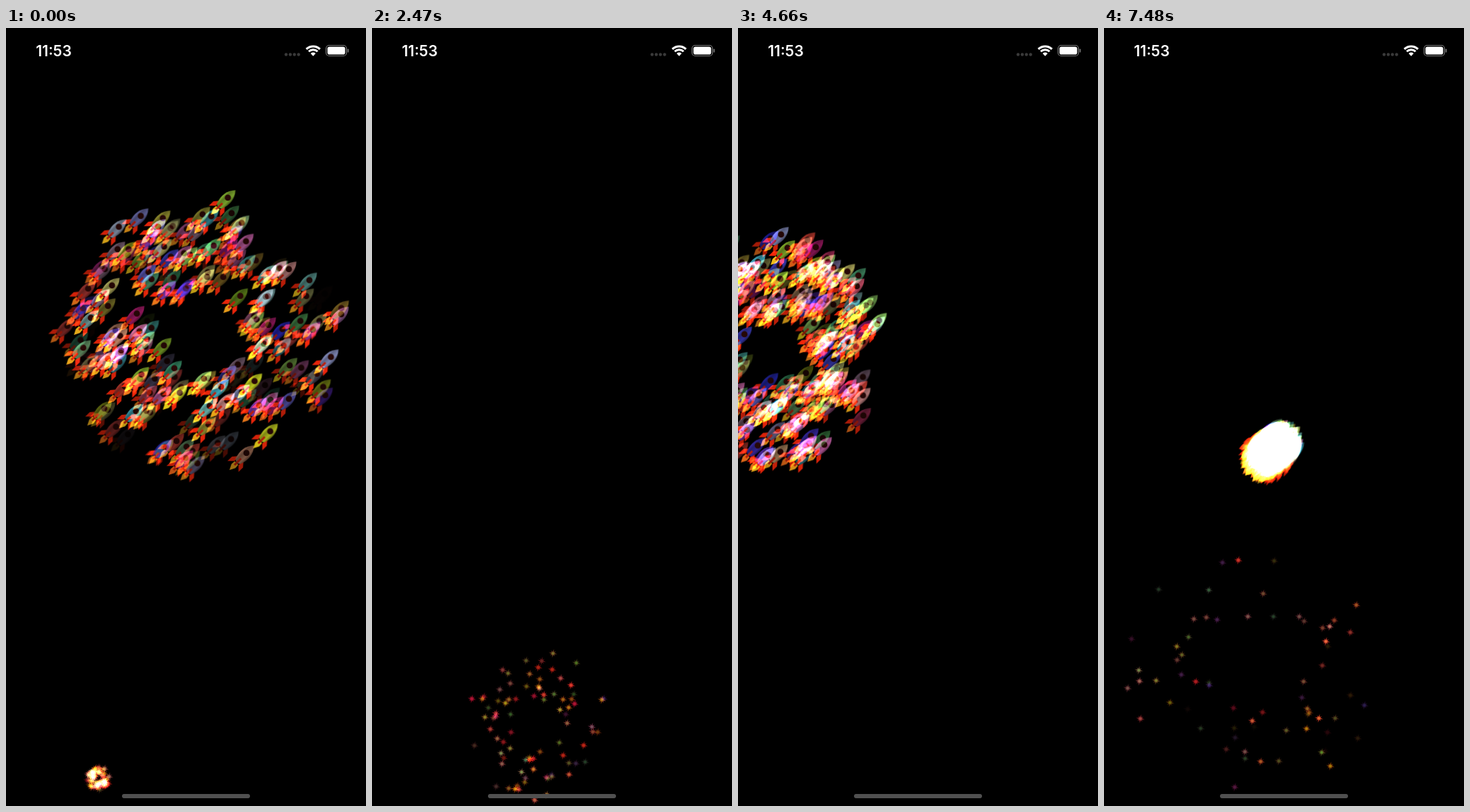
These frames come from a looping animation (509 px wide and 1100 px high, 7530 ms). An HTML page with a canvas:

```html
<!DOCTYPE html>
<html lang="en">
<head>
<meta charset="utf-8">
<title>Fireworks</title>
<style>
  html, body { margin: 0; width: 100%; height: 100%; overflow: hidden; background: #000; }
  canvas { display: block; }
</style>
</head>
<body>
<canvas id="stage" width="509" height="1100"></canvas>
<script>
const LOOP = 7530, TINTS = 60, SPRITE = 56;
const ctx = document.getElementById('stage').getContext('2d');

// Birth in ms, centre, kind
const bursts = [
  [-600, 275, 430, 'rocket'], [-56, 131, 1061, 'star'], [476, 400, 640, 'rocket'],
  [1035, 90, 382, 'rocket'], [1558, 293, 157, 'rocket'], [2100, 230, 985, 'star'],
  [2640, 362, 987, 'rocket'], [3140, 205, 160, 'rocket'], [3668, 215, 930, 'star'],
  [4170, 52, 455, 'rocket'], [4735, 260, 915, 'rocket'], [5260, 190, 612, 'rocket'],
  [5799, 131, 422, 'star'], [6330, 190, 400, 'rocket'], [6860, 208, 911, 'star'],
  [7392, 237, 599, 'rocket']
];
const kinds = {
  rocket: { count: 190, speed: 0.325, paint: paintRocket },
  star: { count: 85, speed: 0.29, paint: paintStar }
};

function random(seed) {
  return () => {
    seed = (seed + 0x6D2B79F5) | 0;
    let n = Math.imul(seed ^ (seed >>> 15), 1 | seed);
    n = (n + Math.imul(n ^ (n >>> 7), 61 | n)) ^ n;
    return ((n ^ (n >>> 14)) >>> 0) / 4294967296;
  };
}

// A tint holds r, g, b in 0..1
const mix = ([r, g, b], kr, kg = kr, kb = kr) =>
  `rgb(${[r * kr, g * kg, b * kb].map(v => Math.round(v * 255))})`;

function polygon(g, color, points) {
  g.fillStyle = color;
  g.beginPath();
  points.forEach(([x, y]) => g.lineTo(x, y));
  g.fill();
}

function disc(g, color, x, y, r) {
  g.fillStyle = color;
  g.beginPath();
  g.arc(x, y, r, 0, 7);
  g.fill();
}

function pill(color, x, y, w, h, r) {
  ctx.fillStyle = color;
  ctx.beginPath();
  ctx.roundRect(x, y, w, h, r);
  ctx.fill();
}

// Nose points along +x before the turn
function paintRocket(g, tint) {
  g.rotate(-Math.PI / 4);
  polygon(g, mix([0.95, 0.35 + 0.5 * tint[1], 0.1], 1),
    [[-10, -3.5], [-16, -4], [-24, 0], [-16, 4], [-10, 3.5]]);
  for (const s of [-1, 1]) {
    polygon(g, '#f4260a', [[-1, 5 * s], [-8, 11 * s], [-17, 11 * s], [-10, 4 * s]]);
  }
  const shade = g.createLinearGradient(0, -8, 0, 8);
  [[0, 0.95], [0.3, 0.6], [0.7, 0.8], [1, 0.4]].forEach(([at, k]) =>
    shade.addColorStop(at, mix(tint, k)));
  g.fillStyle = shade;
  g.beginPath();
  g.moveTo(25, 0);
  g.quadraticCurveTo(12, -12, -7, -5);
  g.lineTo(-10, 0);
  g.lineTo(-7, 5);
  g.quadraticCurveTo(12, 12, 25, 0);
  g.fill();
  disc(g, '#2a0806', 10, 0, 4.4);
  polygon(g, '#c81e0a', [[-14, -1.4], [-1, -1.4], [-1, 1.4], [-14, 1.4]]);
}

function paintStar(g, tint) {
  const spikes = (outer, inner) => Array.from({ length: 16 }, (_, i) => {
    const a = i * Math.PI / 8 + 0.2, r = i % 2 ? inner : outer - (i % 4 ? 1.2 : 0);
    return [r * Math.cos(a), r * Math.sin(a)];
  });
  polygon(g, mix(tint, 1, 0.4, 0.3), spikes(6, 2.1));
  polygon(g, mix(tint, 1, 0.75, 0.4), spikes(3.2, 1.4));
}

function makeSprite(paint, tint) {
  const c = document.createElement('canvas');
  c.width = c.height = SPRITE;
  const g = c.getContext('2d');
  g.translate(SPRITE / 2, SPRITE / 2);
  paint(g, tint);
  return c;
}

const tintRnd = random(11);
const tints = Array.from({ length: TINTS }, () => {
  const part = low => low + (1 - low) * tintRnd();
  return [part(0.15), part(0.12), part(0.1)];
});
for (const kind of Object.values(kinds)) {
  kind.sprites = tints.map(tint => makeSprite(kind.paint, tint));
}

const shows = bursts.map(([birth, x, y, name], i) => {
  const kind = kinds[name], rnd = random(100 + i);
  const parts = Array.from({ length: kind.count }, () => ({
    angle: rnd() * 2 * Math.PI,
    speed: kind.speed * (0.31 + 0.69 * rnd() ** 0.9),
    life: 580 + 180 * rnd(),
    alpha: 0.45 + 0.55 * rnd() ** 0.6,
    sprite: kind.sprites[Math.floor(rnd() * TINTS)]
  }));
  return { birth, x, y, parts };
});

function drawBurst({ birth, x, y, parts }, t) {
  const age = t - birth;
  if (age < 0) return;
  for (const p of parts) {
    if (age >= p.life) continue;
    const r = p.speed * age;
    ctx.globalAlpha = p.alpha * Math.min(1, (p.life - age) / 50);
    ctx.drawImage(p.sprite, x + r * Math.cos(p.angle) - SPRITE / 2,
      y + r * Math.sin(p.angle) - SPRITE / 2);
  }
}

function drawChrome() {
  pill('#000', 150, -30, 206, 74, 22);
  ctx.fillStyle = '#fff';
  ctx.font = '600 21px Inter, "Liberation Sans", sans-serif';
  ctx.textAlign = 'center';
  ctx.fillText('11:53', 67.5, 40);
  for (let i = 0; i < 4; i++) disc(ctx, '#3a3a3a', 396 + i * 5.9, 37.5, 2.2);

  ctx.strokeStyle = '#fff';
  ctx.lineWidth = 3;
  for (const r of [13.6, 8.8]) {
    ctx.beginPath();
    ctx.arc(434.3, 39.5, r, -Math.PI * 0.75, -Math.PI * 0.25);
    ctx.stroke();
  }
  ctx.fillStyle = '#fff';
  ctx.beginPath();
  ctx.moveTo(434.3, 39.8);
  ctx.arc(434.3, 39.5, 5, -Math.PI * 0.75, -Math.PI * 0.25);
  ctx.fill();

  ctx.strokeStyle = '#777';
  ctx.lineWidth = 1.2;
  ctx.beginPath();
  ctx.roundRect(452.5, 24.5, 29, 15, 4.5);
  ctx.stroke();
  pill('#fff', 454.5, 26.5, 25, 11, 2.8);
  pill('#777', 482.8, 29.5, 1.7, 5, 1);
  pill('#505050', 164, 1083, 181, 6, 3);
}

function frame(now) {
  const t = now % LOOP;
  ctx.globalAlpha = 1;
  ctx.globalCompositeOperation = 'source-over';
  ctx.fillStyle = '#000';
  ctx.fillRect(0, 0, 509, 1100);
  ctx.globalCompositeOperation = 'lighter';
  shows.forEach(show => drawBurst(show, t));
  ctx.globalAlpha = 1;
  ctx.globalCompositeOperation = 'source-over';
  drawChrome();
}

const start = performance.now();
function tick() {
  frame(performance.now() - start);
  requestAnimationFrame(tick);
}
tick();
</script>
</body>
</html>
```
